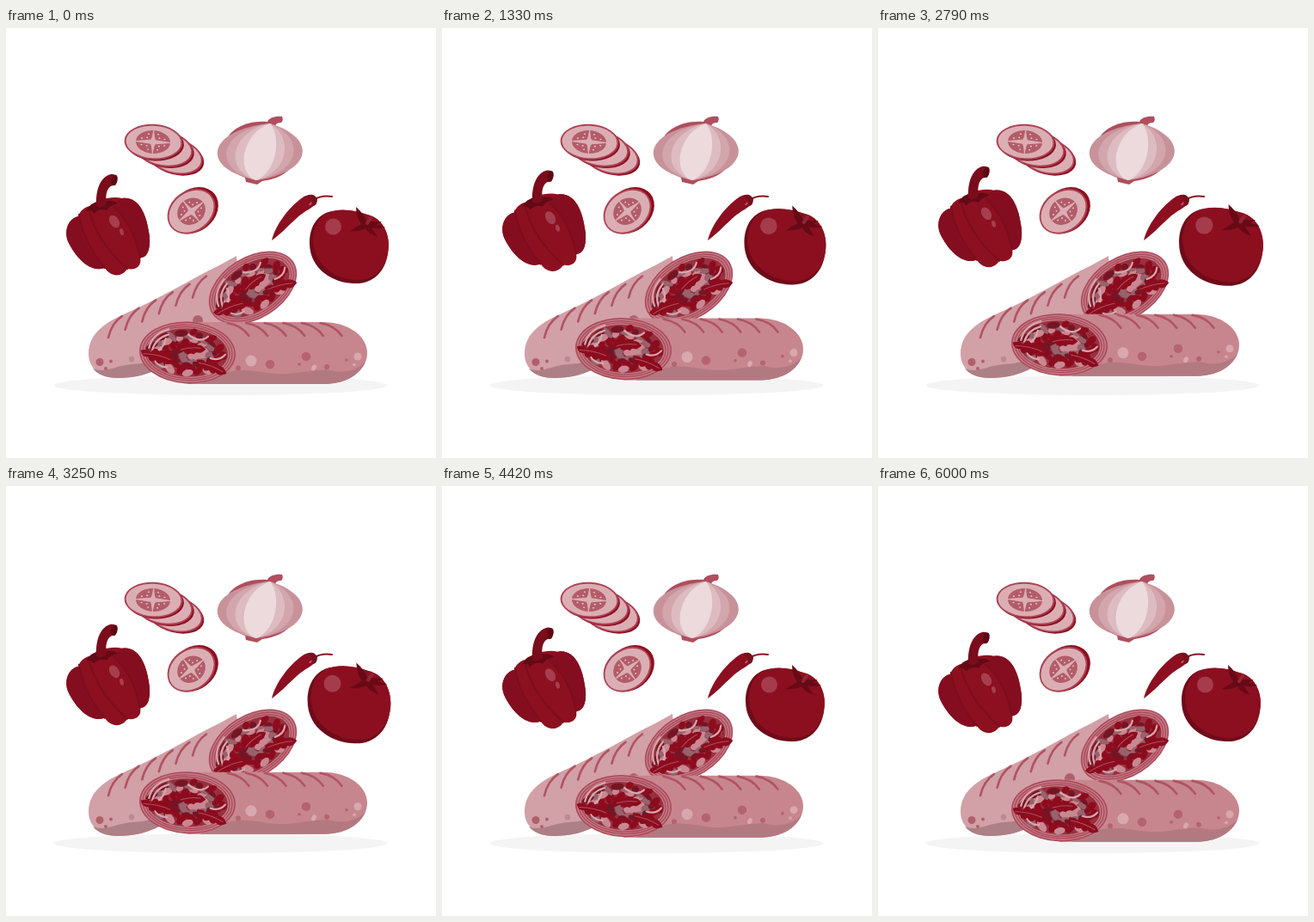
An HTML page that plays this animation: 500 by 500 pixels, repeating every 6.04 s.

```html
<!DOCTYPE html>
<html lang="en">
<head>
<meta charset="utf-8">
<title>Wraps and vegetables</title>
<style>
html, body { margin: 0; width: 100%; height: 100%; overflow: hidden; background: #fff; }
svg { display: block; width: 100vw; height: 100vh; }
.line { fill: none; stroke-linecap: round; }
.mark { stroke: #b15363; stroke-width: 2.6; }
</style>
</head>
<body>
<svg viewBox="0 0 500 500">
<defs>
  <g id="slice">
    <ellipse rx="35" ry="22" fill="#ad4253"/>
    <ellipse rx="33" ry="20" fill="#dbaeb4"/>
  </g>
  <g id="core">
    <ellipse rx="20" ry="13.5" fill="#b35c69"/>
    <path d="M0-14Q1-3 3-2L20 0 3 2Q1 3 0 14Q-1 3-3 2L-20 0-3-2Q-1-3 0-14Z" fill="#dbaeb4" stroke="#dbaeb4"/>
    <g id="seeds"></g>
  </g>
  <path id="leaf" d="M-21-3Q-13-7-9-3Q-5-12 0-6Q5-10 8-4Q15-6 21 3Q12 10 7 5Q3 11-2 5Q-9 10-11 3Q-18 5-21-3Z" fill="#8c0c1e"/>
  <g id="face">
    <ellipse rx="56" ry="36" fill="#ad4658"/>
    <ellipse rx="54.5" ry="34.5" fill="#c07a84"/>
    <g class="line" stroke="#ad4658" stroke-width="1.2">
      <ellipse rx="52" ry="32.3"/>
      <ellipse rx="49" ry="30"/>
    </g>
    <ellipse rx="47" ry="28" fill="#98303f"/>
    <g id="filling"></g>
    <path class="line" d="M-45-3Q-42-20-23-26M-41-1Q-38-15-23-20M-35 0Q-27-6-26-15M0-21Q14-11 23-20M-39 8Q-34 19-23 18M27 5Q38 8 44 0" stroke="#d9a5ac" stroke-width="2.2"/>
    <use href="#leaf" transform="translate(-34 6) rotate(8)"/>
    <use href="#leaf" transform="translate(4-5) rotate(-8) scale(.8)"/>
    <use href="#leaf" transform="translate(29 15) rotate(14) scale(.9)"/>
    <path class="line" d="M-51 4Q-36 3-20 9M-8-3Q4-7 15-6M14 11Q29 13 42 20" stroke="#b04d5d"/>
  </g>
</defs>

<ellipse cx="249.5" cy="415.5" rx="194" ry="11.5" fill="#f4f4f4"/>

<!-- cucumber -->
<g id="stack"></g>
<use href="#core" transform="translate(171 132.500) rotate(3)"/>
<ellipse rx="31" ry="24.5" transform="translate(218.2 212.2) rotate(-38)" fill="#8c0f20"/>
<g transform="translate(215.5 213.2) rotate(-38) scale(.86 1.09)">
  <use href="#slice"/>
  <use href="#core"/>
</g>

<!-- onion -->
<path d="M304 109C306 104 314 102 321 103Q323 107 320 110C314 110 312 113 314 117C328 121 337 132 337 148C335 168 314 176 298 178L292 182 279 179 278 174C262 168 253 155 254 138C256 118 280 107 304 109Z" fill="#b04e5e"/>
<g id="bands"></g>

<!-- chili -->
<path class="line" d="M357 200Q367 194 379 196" stroke="#8c0f20" stroke-width="2"/>
<path d="M309 247C313 230 328 209 345 197C353 191 362 196 361 202C359 209 347 212 337 222C327 231 318 241 309 247Z" fill="#8c0f20"/>
<path d="M350 195Q358 191 362 199Q362 206 357 207Q358 199 350 195Z" fill="#74101d"/>
<ellipse rx="2.2" ry="1" transform="translate(354 204.5) rotate(-45)" fill="#b85c69"/>

<!-- tomato -->
<g id="tomato">
  <path d="M380 213C395 210 408 213 420 217C439 221 448 242 444 262C441 284 426 298 405 297C383 297 353 282 353 250C353 229 364 215 380 213Z" fill="#6f0b19"/>
  <path d="M382 212.500C395 210 408 213 420 217C439 221 448 242 444 262C440 282 427 293 408 293C387 293 358 278 357 248C357 229 366 215 382 212.500Z" fill="#8c0f20"/>
  <circle cx="380.5" cy="231" r="9.5" fill="#a43c4b"/>
  <path d="M407 208Q416 216 419 224Q429 226 437 225L430 229Q437 229 441 232Q431 234 425 232L432 243Q421 239 418 233Q410 237 400 236Q408 231 413 228Q407 219 407 208Z" fill="#680916"/>
  <path class="line" d="M420 227L424 221" stroke="#8f2634" stroke-width="4"/>
</g>

<!-- back wrap -->
<path d="M96 379C96 353 119 341 141 331C178 315 213 293 248 276L268 265 275 338Q220 372 183 393C165 404 147 407 130 407C108 407 96 394 96 379Z" fill="#d2a0a7"/>
<path d="M101 396C116 402 128 392 147 391Q166 391 186 380L190 389C167 404 147 407 130 407Q110 407 101 396Z" fill="#ad7f87"/>
<g id="backMarks" class="line mark"></g>
<g class="line" stroke="#b0606c">
  <path d="M109 388.500h0" stroke-width="9"/>
  <path d="M223 340h0" stroke-width="12"/>
  <path d="M116 396h0M122 387.500h0" stroke-width="4"/>
  <path d="M146 385h0" stroke="#b98a91" stroke-width="6.5"/>
</g>
<use href="#face" transform="translate(287 302) rotate(-32)"/>

<!-- pepper -->
<g class="lift">
  <path d="M98 207C91 208 86 213 84 219C71 222 67 238 73 250C81 266 97 285 115 279C122 290 135 290 141 280C152 282 158 276 156 267C166 268 169 252 166 237C163 216 154 195 135 198C124 195 106 199 98 207Z" fill="#8c1020"/>
  <path d="M84 219C71 222 67 238 73 250C81 266 97 285 115 279C103 266 88 247 84 219ZM124 206C141 220 151 240 156 267C166 268 169 252 166 237C163 216 154 195 135 198Z" fill="#840e1f"/>
  <path class="line" d="M85 217C88 241 102 263 115 279M97 213C104 241 122 263 141 280M125 208C142 222 151 244 156 267" stroke="#7c0d1c" stroke-width="2"/>
  <path d="M93 213Q99 201 109 203Q123 198 130 204Q121 206 117 212Q109 209 102 216Q100 210 93 213Z" fill="#640916"/>
  <path d="M105 207C104 190 109 173 122 170C130 169 131 177 127 183C118 182 115 193 117 205Q110 211 105 207Z" fill="#7a0c1b"/>
  <ellipse rx="3.5" ry="6.5" transform="translate(126 177) rotate(15)" fill="#5e0814"/>
  <ellipse rx="5.3" ry="8" transform="translate(126 225) rotate(-32)" fill="#a63f4d"/>
  <ellipse rx="2.3" ry="4" transform="translate(134.5 237) rotate(-15)" fill="#a63f4d"/>
</g>

<!-- front wrap -->
<g class="lift">
  <path d="M211 342H370A50 36 0 0 1 370 414H211Z" fill="#c7868e"/>
  <path d="M245 404C272 393 291 400 313 402C341 404 362 394 382 399Q405 402 418 388C411 405 392 414 370 414H225Z" fill="#b37981"/>
  <g id="frontMarks" class="line mark"></g>
  <g class="line" stroke="#b5636f">
    <path d="M307 391h0M349 382h0" stroke-width="10.5"/>
    <path d="M270 395.500h0M373 394h0" stroke-width="6"/>
    <path d="M341 391h0M396 386h0" stroke-width="3.700"/>
  </g>
  <g class="line" stroke="#d9a8ae">
    <path d="M285 387h0" stroke-width="13"/>
    <path d="M409 382h0" stroke-width="9"/>
    <path d="M357.500 396l1-2" stroke-width="5"/>
    <path d="M405 391.500h0" stroke-width="3.700"/>
  </g>
  <use href="#face" transform="translate(211 377.500) rotate(3)"/>
</g>
</svg>
<script>
const LOOP = 6040;
const $ = id => document.getElementById(id);
const fill = (id, n, part) => $(id).innerHTML = Array.from({ length: n }, (_, i) => part(i)).join('');
const ell = (x, y, rx, ry, color, turn = 0) =>
  `<ellipse rx="${rx}" ry="${ry}" fill="${color}" transform="translate(${x} ${y}) rotate(${turn})"/>`;

let seed = 7;
const rand = (a, b) => a + (b - a) * ((seed = seed * 16807 % 2147483647) / 2147483647);

// slices from the back to the front
fill('stack', 3, i => {
  const k = 2 - i, x = 172 + 12 * k, y = 133 + 8 * k, turn = 3 + 6 * k;
  return ell(x + 1.5, y + 1.5, 33.5, 20, '#8f1024', turn) +
    `<use href="#slice" transform="translate(${x - .5} ${y - .5}) rotate(${turn}) scale(.97 .94)"/>`;
});

// three seeds in each quarter
fill('seeds', 12, i => {
  const a = (Math.floor(i / 3) + .25 * (i % 3 + 1)) * Math.PI / 2, r = i % 3 == 1 ? .5 : .72;
  return ell(20 * r * Math.cos(a), 13.5 * r * Math.sin(a), 1.2, .8, '#e3c3c7');
});

const shades = ['#c8929a', '#d3a5ac', '#ddbcc1', '#ecdadd'];
fill('bands', 4, i => {
  const w = 56 - 14 * i;
  return `<path d="M307 111C${292 - w} ${118 + i} ${281 - w} 160 ${283 + i} 175L291 177` +
    `C${300 + w} 168 ${307 + w} 128 307 111Z" fill="${shades[i]}"/>`;
});

fill('backMarks', 6, i => `<path d="M${119 + 19.6 * i} ${360 - 9.3 * i}q4-17 16-25"/>`);
fill('frontMarks', 6, i => `<path d="M${257.5 + 21.6 * i} 343q17 3 25 15"/>`);

// chopped filling, spread evenly by a sunflower spiral
const mix = ['#8c0c1e', '#96636c', '#8c0c1e', '#c98791', '#741525'];
fill('filling', 60, i => {
  const r = Math.sqrt((i + .5) / 60), a = i * 2.39996;
  return ell(43 * r * Math.cos(a), 25 * r * Math.sin(a), rand(4, 8), rand(2.5, 4.5), mix[i % 5], rand(-50, 50));
});

const tent = (t, from, peak, to) =>
  Math.max(0, Math.min((t - from) / (peak - from), (to - t) / (to - peak)));

const lifted = document.querySelectorAll('.lift');
const start = performance.now();
function draw() {
  const t = (performance.now() - start) % LOOP;
  const y = -10 * tent(t, 0, LOOP / 2, LOOP);
  const scale = 1 + .095 * (tent(t, 0, 750, 1650) + tent(t, 2400, 2980, 3580));
  lifted.forEach(g => g.setAttribute('transform', `translate(0 ${y})`));
  $('tomato').setAttribute('transform', `translate(399 254.5) scale(${scale}) translate(-399 -254.5)`);
  requestAnimationFrame(draw);
}
draw();
</script>
</body>
</html>
```
